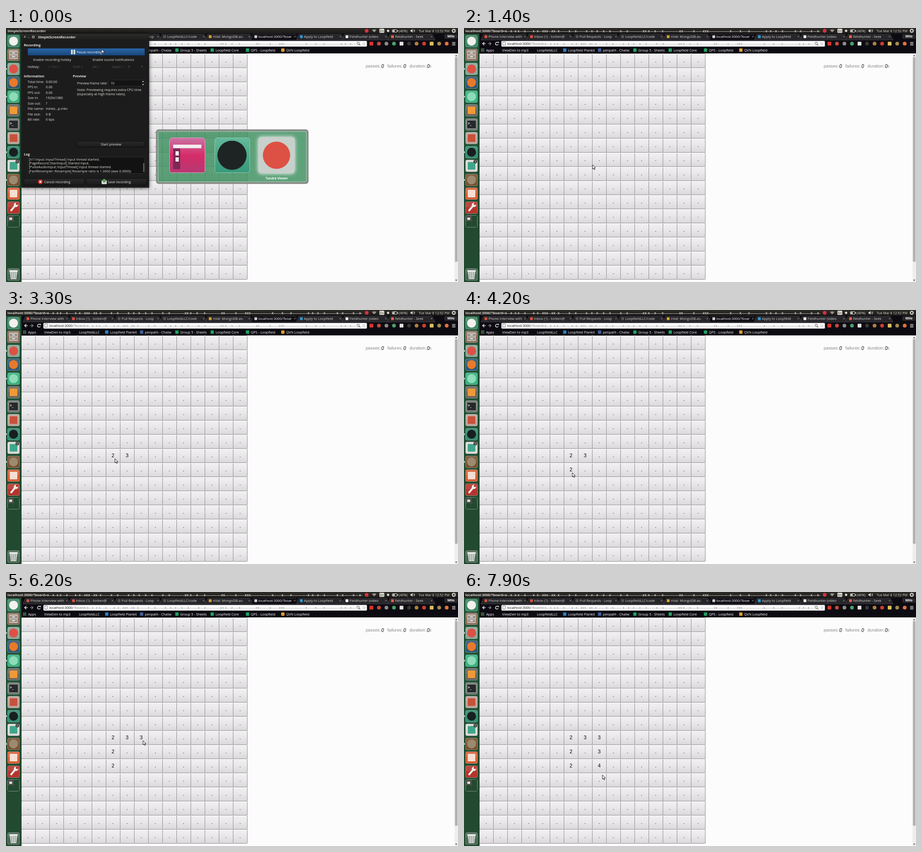
An HTML page with a canvas for the animation above (8000 ms loop, 960 px wide and 540 px high).

```html
<!DOCTYPE html>
<html lang="en">
<head>
<meta charset="utf-8">
<title>Desktop recording</title>
<style>
html, body { margin: 0; width: 960px; height: 540px; overflow: hidden; background: #fdfcfd; }
canvas { display: block; }
</style>
</head>
<body>
<canvas id="stage" width="960" height="540"></canvas>
<script>
const g = document.getElementById('stage').getContext('2d');
const LOOP = 8000, STEP = 100, SWITCH = 200;
const UI = '"Open Sans", "Noto Sans", sans-serif';
const PAGE = '"Liberation Sans", Arial, sans-serif';

function rect(x, y, w, h, fill, r = 0, stroke) {
  g.beginPath();
  g.roundRect(x, y, w, h, r);
  if (fill) { g.fillStyle = fill; g.fill(); }
  if (stroke) { g.strokeStyle = stroke; g.lineWidth = 1; g.stroke(); }
}
function disc(x, y, r, fill) {
  g.beginPath();
  g.arc(x, y, r, 0, 7);
  g.fillStyle = fill;
  g.fill();
}
function arc(x, y, r, from, to, stroke, width = 1) {
  g.beginPath();
  g.arc(x, y, r, from, to);
  g.strokeStyle = stroke;
  g.lineWidth = width;
  g.stroke();
}
function poly(points, fill, stroke, width = 1) {
  g.beginPath();
  points.forEach(([x, y]) => g.lineTo(x, y));
  if (fill) { g.closePath(); g.fillStyle = fill; g.fill(); }
  if (stroke) { g.strokeStyle = stroke; g.lineWidth = width; g.stroke(); }
}
function fade(y0, y1, ...colors) {
  const f = g.createLinearGradient(0, y0, 0, y1);
  colors.forEach((c, i) => f.addColorStop(i / (colors.length - 1), c));
  return f;
}
// y is the middle of the line; maxW clips; returns the natural width
function text(s, x, y, { size = 7.3, color = '#e6e4e0', style = '', font = UI, align = 'left', maxW } = {}) {
  g.save();
  if (maxW) { g.beginPath(); g.rect(x, y - 8, maxW, 16); g.clip(); }
  g.font = `${style} ${size}px ${font}`;
  g.fillStyle = color;
  g.textAlign = align;
  g.fillText(s, x, y + size * 0.36);
  const { width } = g.measureText(s);
  g.restore();
  return width;
}

// Seeded 16 x 16 mine board, shown in the address
let seed = 11;
const rnd = () => (seed = seed * 16807 % 2147483647) / 2147483647;
const board = 'x---x--x-x----x------x--x---xxx---x' +
  Array.from({ length: 221 }, () => rnd() < 0.17 ? 'x' : '-').join('');
const host = 'localhost:3000', query = '/?board=' + board;

// column, row, number, time revealed
const reveals = [[7, 8, 3, 2100], [6, 8, 2, 3300], [6, 9, 2, 4000], [6, 10, 2, 4800],
  [8, 8, 3, 5700], [8, 9, 3, 6700], [8, 10, 4, 7400]];
// time, x, y
const path = [[0, 203, 45], [200, 203, 47], [600, 273, 289], [1500, 273, 291], [1900, 264.5, 316],
  [2700, 264.5, 316], [3000, 234, 316], [3500, 230, 316], [3900, 230, 346], [4400, 230, 346],
  [4700, 230, 376], [4950, 231, 376], [5250, 304, 288], [5500, 290.5, 314], [6200, 291, 316],
  [6600, 292, 345], [6800, 292, 346], [7000, 293, 363], [7600, 293, 364], [7900, 294, 389]];

function pointer(t) {
  const i = path.findIndex(p => p[0] >= t);
  if (i < 1) return path[0].slice(1);
  const [t0, x0, y0] = path[i - 1], [t1, x1, y1] = path[i];
  const u = (t - t0) / (t1 - t0), k = u * u * (3 - 2 * u);
  return [x0 + (x1 - x0) * k, y0 + (y1 - y0) * k];
}

function page(t) {
  rect(0, 0, 960, 540, '#fdfcfd');
  for (let r = 0; r < 16; r++) {
    const y = 54 + 30 * r;
    const face = fade(y, y + 30, '#f3f2f3', '#e9e7e9', '#dbd9db');
    for (let c = 0; c < 16; c++) {
      const x = 33 + 30 * c;
      rect(x - 0.5, y + 0.5, 30, 30, face, 1.5, '#929092');
      const hit = reveals.find(v => v[0] === c && v[1] === r && t >= v[3]);
      text(hit ? hit[2] : '.', x + 14.3, y + 15, { size: 10.7, color: '#000', font: PAGE, align: 'center' });
    }
    rect(33, y + 1, 479, 1, '#ffffffb0');
  }
  [['passes:', 764, 797], ['failures:', 810, 844], ['duration:', 857, 894]].forEach(([label, x, n]) => {
    text(label, x, 81, { size: 9.2, color: '#888', font: PAGE });
    text('0', n, 81, { size: 10, color: '#000', style: 'italic', font: PAGE });
  });
  text('s', 899, 81, { size: 9.2, color: '#888', font: PAGE });
  rect(952.5, 54, 7.5, 486, '#efeeef');
  rect(953.5, 62, 5.5, 435, '#b3b1b3', 1);
  poly([[954, 60], [956.2, 57], [958.4, 60]], '#555');
  poly([[954, 535], [956.2, 538], [958.4, 535]], '#555');
}

const tabs = [['Phone Interview with', '#d9503f'], ['Inbox (1) - torben@', '#d9503f'],
  ['Pull Requests · Loop', '#55544f'], ['LoopfieldLLC/code', '#55544f'], ['nVat: MongoDB-as-', '#d6a136'],
  ['localhost:3000/?boar', '#cfcdc8'], ['Apply to Loopfield', '#2f9bd0'], ['Fieldhunter (video', '#f2f1ef'],
  ['fieldhunter - Seek', '#e2604c']];
const marks = [['Apps', 47], ['ViewDen to mp3', 81], ['LoopfieldLLC', 155], ['Loopfield Plankit', 221, '#2f7fc1'],
  ['penpath - Chatwall', 295, '#4460a0'], ['Group 5 - Sheets', 370, '#1fa463'], ['Loopfield Core', 445, '#1fa463'],
  ['QPS - Loopfield', 520, '#1fa463'], ['QVN Loopfield', 595, '#e0a030']];
const extensions = ['#d8342c', '#c8483a', '#8d8b86', '#4aa06a', '#e4e2de', '#3a3936', '#b08040', '#d23c30',
  '#d8c05a', '#a08c50', '#e8703c'];
const BAR = '#0d0b12';

function browser() {
  rect(33, 12, 927, 42, BAR);
  tabs.forEach(([label, icon], i) => {
    const x = 36 + 96.8 * i;
    poly([[x, 25.5], [x + 5, 13.5], [x + 95, 13.5], [x + 101, 25.5]], i === 5 ? BAR : '#262529', '#4b494d', 0.7);
    rect(x + 7.5, 15.5, 6, 6, icon, 1);
    text(label, x + 16, 18.5, { maxW: 76, color: i === 5 ? '#fff' : '#d8d6d1' });
    text('×', x + 91, 18.5, { size: 8, color: '#aaa8a3' });
  });
  rect(931, 13, 28, 10, '#28272a', 2);
  text('Milo', 945, 17.5, { align: 'center', style: 'bold', size: 7, color: '#fff' });

  poly([[43, 30], [39.5, 33.2], [43, 36.5]], null, '#eee', 1.3);
  poly([[39.5, 33.2], [46, 33.2]], null, '#eee', 1.3);
  poly([[54, 30], [57.5, 33.2], [54, 36.5]], null, '#8b8990', 1.3);
  poly([[51, 33.2], [57.5, 33.2]], null, '#8b8990', 1.3);
  arc(70, 33.3, 3, 0.4, 5.6, '#eee', 1.3);
  poly([[71, 29.5], [74, 29.5], [74, 32.8]], '#eee');
  rect(79.5, 27.5, 687, 12, '#fdfcfd', 2, '#8a888c');
  rect(82.5, 29.5, 5, 7, '#fff', 0, '#777');
  const hostW = text(host, 92, 33.5, { color: '#111' });
  text(query, 92 + hostW, 33.5, { color: '#777', maxW: 651 - hostW });
  arc(748, 32.5, 2.5, 0, 7, '#555');
  poly([[750, 34.5], [752.5, 37]], null, '#555', 1.2);
  text('☆', 755.5, 33, { size: 10, color: '#666' });
  extensions.forEach((c, i) => {
    const x = 776 + 16 * i;
    if (i % 4) disc(x, 33.3, 4, c); else rect(x - 4, 29.3, 8, 8, c, 1);
  });
  for (let i = 0; i < 3; i++) rect(947.5, 30 + 2.8 * i, 7, 1.3, '#dedcd8');

  for (let i = 0; i < 9; i++) {
    rect(36 + i % 3 * 2.5, 43.5 + Math.floor(i / 3) * 2.5, 1.8, 1.8, ['#d9503f', '#58a65c', '#4a86d8'][i % 3]);
  }
  marks.forEach(([label, x, icon]) => {
    if (icon) rect(x - 10.5, 43.5, 7, 7, icon, 1);
    text(label, x, 47.2, { color: '#fff', maxW: label.includes(' - ') || label.includes('Core') ? 56 : 70 });
  });
}

function panel(title) {
  const ink = '#dfdbd2';
  rect(0, 0, 960, 12, fade(0, 12, '#2d2c29', '#1b1a19'));
  text(title, 3, 6, { style: 'bold', color: ink, maxW: 754 });
  disc(766, 6, 4, '#d6303c');
  [2, 4, 6].forEach(r => arc(782, 9.5, r, -2.3, -0.84, ink, 1.2));
  rect(793, 1.5, 10.5, 9, ink, 1.5);
  text('En', 798.2, 6, { size: 7, color: '#33322e', align: 'center' });
  disc(811.5, 6, 2.5, ink);
  rect(820.5, 3.5, 10, 5.5, null, 1, ink);
  rect(821.5, 4.5, 4, 3.5, ink);
  rect(831, 5, 1.5, 2.5, ink);
  text('(40%)', 834, 6, { color: ink });
  poly([[859, 4.5], [861, 4.5], [863.5, 2], [863.5, 10], [861, 7.5], [859, 7.5]], ink);
  [2, 4].forEach(r => arc(864, 6, r, -0.9, 0.9, ink));
  text('Tue Mar 8 12:52 PM', 876.5, 6, { color: ink, size: 7.1 });
  arc(951, 6, 2.8, 0, 7, ink, 1.8);
  for (let a = 0; a < 8; a++) disc(951 + 4 * Math.cos(a * 0.785), 6 + 4 * Math.sin(a * 0.785), 0.8, ink);
}

// y, tile, mark colour, shape
const dock = [[28, '#3f8767', '#f3f1ee', 'o'], [57, '#8b6a55', 0, 'files'], [87, '#8ba698', '#dd5144', 'o'],
  [116, '#2d5876', '#e77a2b', 'o'], [146, '#3bb07f', '#8edbb8', 'o'], [175, '#696560', '#ef9a37', 's'],
  [205, '#6a716d', 0, 'term'], [234, '#b8a59b', '#c8513a', 's'], [264, '#318b72', '#191e1e', 'o'],
  [293, '#dcd9d6', '#3fa68b', 's'], [323, '#77512f', '#9c8a70', 'o'], [352, '#d95c34', '#f4dfd2', 's'],
  [382, '#b3352c', 0, 'tool'], [411, '#35543f', 0, 'spaces'], [524, '#4a6453', 0, 'trash']];

function launcher() {
  rect(0, 12, 33, 528, fade(12, 540, '#235238', '#1f5237', '#214e34', '#234a31', '#224a30'));
  rect(32, 12, 1, 528, '#17382a');
  dock.forEach(([y, tile, mark, kind]) => {
    rect(3.5, y - 12.5, 25, 25, tile, 3, '#ffffff55');
    rect(4, y - 12, 24, 11, '#ffffff18', 3);
    if (kind === 'o') disc(16, y, 9.5, mark);
    if (kind === 's') rect(8, y - 8, 16, 16, mark, 1);
    if (kind === 'files') {
      rect(7, y - 9, 18, 18, '#d8d2cb', 1);
      [y - 7, y + 1].forEach(v => { rect(8, v, 16, 6.5, '#9c938b'); rect(13, v + 2, 6, 2, '#eee'); });
    }
    if (kind === 'term') {
      rect(6, y - 9, 20, 18, '#26292a', 1, '#bbb');
      text('>_', 8, y - 2, { style: 'bold', size: 8, color: '#fff' });
    }
    if (kind === 'tool') {
      poly([[10, y + 7], [20, y - 5]], null, '#eee', 4);
      disc(21, y - 6, 4.5, '#eee');
      disc(23, y - 8, 2.3, tile);
    }
    if (kind === 'spaces') {
      for (let i = 0; i < 4; i++) rect(4 + i % 2 * 12.2, y - 12 + (i >> 1) * 12.2, 11.5, 11.5, i ? '#23492f' : '#4b504c');
      rect(7, y - 8, 6, 5, '#ddd');
    }
    if (kind === 'trash') {
      poly([[8, y - 7], [24, y - 7], [22, y + 10], [10, y + 10]], '#c9d0cb');
      [12, 16, 20].forEach(x => poly([[x, y - 5], [x, y + 8]], null, '#7e8a83'));
      rect(7, y - 9, 18, 3, '#edf0ee', 1);
    }
  });
  disc(24, 284, 4, '#4b4b4b');
  text('1', 24, 284, { size: 6, align: 'center', color: '#fff' });
  [87, 146, 264, 323].forEach(y => poly([[0, y - 2.5], [2.5, y], [0, y + 2.5]], '#e8e8e8'));
}

const info = [['Total time:', '0:00:00'], ['FPS in:', '0.00'], ['FPS out:', '0.00'], ['Size in:', '1920x1080'],
  ['Size out:', '?'], ['File name:', 'mines…p.mkv'], ['File size:', '0 B'], ['Bit rate:', '0 bps']];
const log = ['[X11Input::InputThread] Input thread started.', '[PageRecord::StartInput] Started input.',
  '[PulseAudioInput::InputThread] Input thread started.',
  '[FastResampler::Resample] Resample ratio is 1.0000 (was 0.0000).'];

function recorder() {
  const label = (s, x, y, o) => text(s, x, y, { size: 7.15, ...o });
  const head = (s, x, y) => label(s, x, y, { style: 'bold' });
  const button = (x, y, w, h) => rect(x, y, w, h, fade(y, y + h, '#2b2b2b', '#191919'), 2, '#0e0e0e');
  const check = (x, y) => rect(x, y - 3, 6, 6, '#141414', 1, '#2c2c2c');
  g.save();
  g.shadowColor = '#000a';
  g.shadowBlur = 8;
  rect(33, 12, 271, 327.5, '#1c1c1c');
  g.restore();
  rect(33, 12, 271, 13, fade(12, 25, '#2c2b2a', '#1e1e1e'));
  label('×', 37.5, 19, { size: 9 });
  label('–', 46.5, 19);
  rect(56, 17, 4, 4, null, 0, '#ddd');
  head('SimpleScreenRecorder', 68, 19.5);
  head('Recording', 38, 36);
  rect(46, 43, 249, 15.5, fade(43, 59, '#2c67a6', '#174477'), 2, '#10253d');
  rect(138, 46, 3.8, 10, '#d5dce2', 0.5);
  rect(143.3, 46, 3.8, 10, '#d5dce2', 0.5);
  label('Pause recording', 150, 51, { color: '#fff' });
  check(49, 67.5);
  label('Enable recording hotkey', 58, 67.5);
  check(174, 67.5);
  label('Enable sound notifications', 184, 67.5);
  label('Hotkey:', 46, 82.5);
  [['✓ Ctrl +', 89], ['Shift +', 142], ['Alt +', 184], ['Super +', 225], ['R', 259]]
    .forEach(([s, x]) => label(s, x, 82.5, { color: '#55534f' }));
  poly([[286, 81], [291, 81], [288.5, 84]], '#444');
  head('Information', 38, 102.5);
  info.forEach(([k, v], i) => {
    label(k, 46, 114 + 11.5 * i);
    label(v, 84.5, 114 + 11.5 * i);
  });
  head('Preview', 142, 102.5);
  label('Preview frame rate:', 151, 117);
  rect(218.5, 110.5, 76, 13, '#141414', 2, '#2b2b2b');
  label('10', 222, 117);
  poly([[289, 115], [291, 112], [293, 115]], '#ccc');
  poly([[289, 119], [291, 122], [293, 119]], '#ccc');
  label('Note: Previewing requires extra CPU time', 151, 131.5);
  label('(especially at high frame rates).', 151, 140);
  button(151, 241, 144, 12.5);
  label('Start preview', 223, 247, { align: 'center' });
  head('Log', 38, 268);
  rect(46.5, 274.5, 248, 35, '#121212', 1, '#2d2d2d');
  log.forEach((s, i) => label(s, 48.5, 279 + 8.4 * i));
  rect(291, 287, 3, 19, '#555', 1);
  button(38, 320, 129, 14);
  disc(73, 327, 5, '#d6302f');
  poly([[71, 325], [75, 329]], null, '#fff', 1.4);
  poly([[75, 325], [71, 329]], null, '#fff', 1.4);
  label('Cancel recording', 81, 327);
  button(171, 320, 128, 14);
  rect(203, 324, 11, 8, '#d5d8d5', 1);
  poly([[206, 321], [211, 321], [211, 325], [213, 325], [208.5, 329], [204, 325], [206, 325]], '#52a34a');
  label('Save recording', 216, 327);
}

function switcher() {
  rect(320.5, 217.5, 320, 112, '#3c8f5ed0', 4);
  g.lineWidth = 4;
  g.strokeStyle = '#858985';
  g.stroke();
  rect(323, 220, 315, 107, null, 1, '#b8d2c0');
  rect(347.5, 233.5, 75, 74, fade(233, 308, '#c976a4', '#d62c68', '#b53972'), 5, '#e3a0bf');
  rect(355, 248, 60, 7.5, '#f2eef0');
  rect(355, 256, 15, 44, '#7c2857');
  [262, 275].forEach(y => rect(360, y, 7, 9, '#f2eef0'));
  rect(443.5, 233.5, 74, 74, fade(233, 308, '#64b999', '#37987a'), 5, '#8accb0');
  disc(480, 270.5, 31, '#1e2424');
  g.save();
  g.shadowColor = '#fff';
  g.shadowBlur = 9;
  rect(536, 232, 77, 77, '#c8d0cb', 6);
  g.restore();
  disc(574.5, 270.5, 29, '#dd5144');
  text('Tundra Viewer', 575, 319.5, { size: 6.6, style: 'bold', align: 'center', color: '#fff' });
}

function arrow(x, y) {
  const shape = [[0, 0], [0, 9], [2.1, 7.1], [3.6, 10.3], [5, 9.6], [3.6, 6.6], [6.3, 6.4]];
  g.save();
  g.translate(x, y);
  g.lineJoin = 'round';
  poly([...shape, shape[0]], '#fff', '#222', 1);
  g.restore();
}

function draw(now) {
  const t = Math.floor(now % LOOP / STEP) * STEP;
  const intro = t < SWITCH;
  page(t);
  browser();
  panel(intro ? 'SimpleScreenRecorder' : host + query);
  launcher();
  if (intro) { recorder(); switcher(); }
  arrow(...pointer(t));
  requestAnimationFrame(draw);
}
requestAnimationFrame(draw);
</script>
</body>
</html>
```
